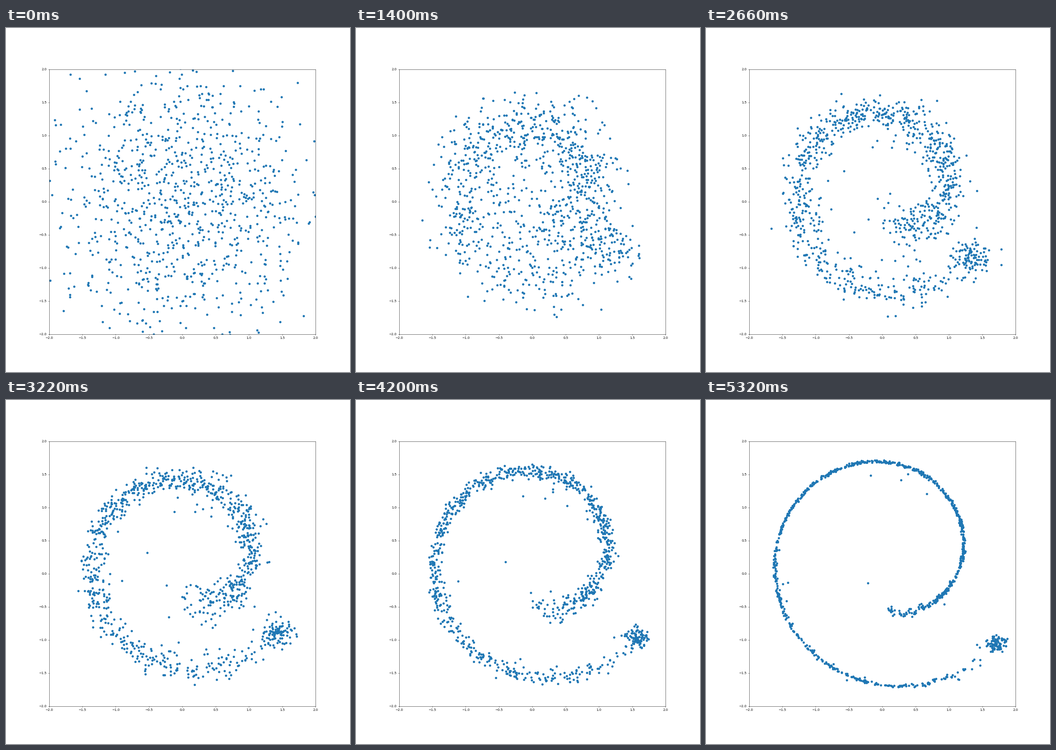
Recreate the animation shown at these times as a matplotlib script. Size 748 px wide and 748 px high, loop 5.46 s.

```python
import numpy as np
import matplotlib.pyplot as plt
from matplotlib.animation import FuncAnimation

SIZE, DPI = 748, 50
FRAMES, INTERVAL = 39, 140
LAST = FRAMES - 1
N = 1000
rng = np.random.default_rng(12)


def make_roll(n=700, n_tip=88):
    """Spiral r = t with uneven density, ending in a loose cluster."""
    t = np.linspace(1.5 * np.pi, 11.75, 2000)
    dens = np.interp(t, [4.7, 5.3, 5.5, 9.3, 10.2, 11.2, 11.75],
                     [62, 70, 145, 150, 115, 100, 75])
    cdf = np.cumsum(dens)
    t = np.interp(np.linspace(cdf[0], cdf[-1], n), cdf, t)
    pts = 0.179 * t[:, None] * np.c_[np.cos(t), np.sin(t)] + [0.08, 0.28]
    spread = np.interp(t, [4.7, 5.4, 5.6, 11.1, 11.75],
                       [0.03, 0.018, 0.006, 0.006, 0.045])
    pts += spread[:, None] * rng.normal(size=(n, 2))
    tip = [1.71, -1.06] + rng.normal(size=(n_tip, 2)) * [0.085, 0.06]
    return np.r_[pts, tip], np.r_[t, np.full(n_tip, 11.9)]


def denoise(y, s):
    """Expected clean position and spiral angle for points at noise level s."""
    d2 = ((y[:, None] - roll[None]) ** 2).sum(-1)
    w = np.exp((d2.min(1, keepdims=True) - d2) / (2 * s * s))
    w /= w.sum(1, keepdims=True)
    return w @ roll, w @ angle


def reverse_diffusion(eta=0.8):
    k = np.arange(FRAMES)
    scale = 0.48 + 0.52 * (k / LAST) ** 0.7
    sigma = np.exp(np.interp(k, [0, 6, 10, 15, 23, 30, LAST],
                             np.log([0.87, 0.34, 0.26, 0.18, 0.1, 0.055, 0.01])))
    s = sigma / scale

    z = rng.normal(size=(N, 2))
    # some points between the arms settle late
    late = (np.hypot(z[:, 0], z[:, 1] + 0.35) < 0.75) & (rng.random(N) < 0.3)
    rate = np.where(late, rng.uniform(0.2, 1, N), 1)[:, None]

    y = z / scale[0]
    path = []
    for i in k:
        clean, ang = denoise(y, s[i])
        loose = 1 + np.exp(-((ang - 4.7) / 0.7) ** 2)
        path.append(scale[i] * (clean + loose[:, None] * (y - clean)))
        if i < LAST:
            a, b = s[i], s[i + 1]
            e = eta * b / a * np.sqrt(a * a - b * b)
            step = clean + np.sqrt(b * b - e * e) / a * (y - clean)
            step += e * rng.normal(size=(N, 2))
            y = y + rate * (step - y)
    return path


roll, angle = make_roll()
path = reverse_diffusion()

fig, ax = plt.subplots(figsize=(SIZE / DPI, SIZE / DPI), dpi=DPI)
dots = ax.scatter(path[0][:, 0], path[0][:, 1])
ax.set_xlim(-2, 2)
ax.set_ylim(-2, 2)


def update(i):
    dots.set_offsets(path[i])
    return (dots,)


anim = FuncAnimation(fig, update, frames=FRAMES, interval=INTERVAL,
                     repeat=True, repeat_delay=0)
plt.show()
```
